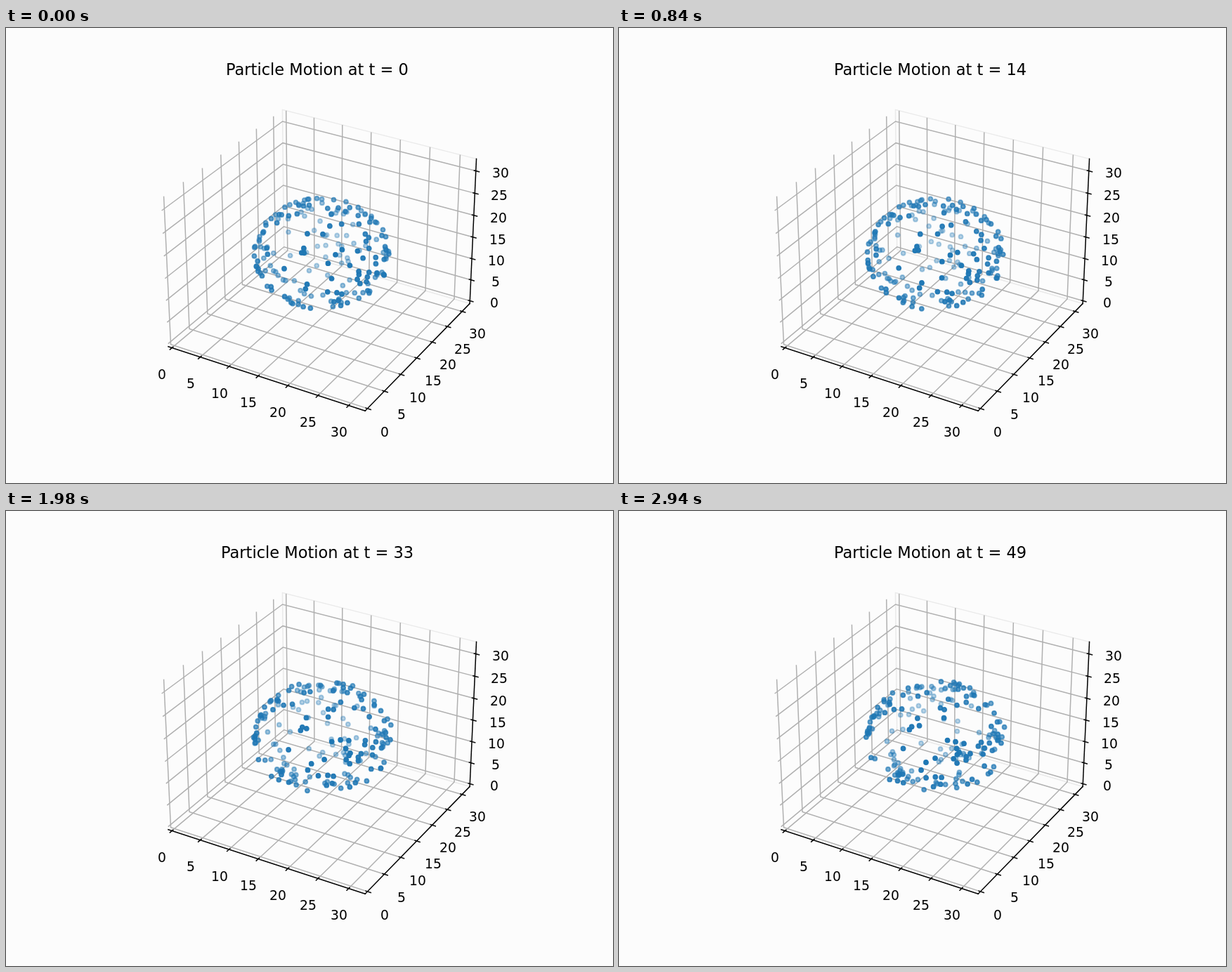
Animation of 864x648 px, one loop 3 s. Source, as an HTML page with a canvas:

```html
<!DOCTYPE html>
<html lang="en">
<head>
<meta charset="utf-8">
<title>Particle Motion</title>
<style>
html, body { margin: 0; width: 100%; height: 100%; overflow: hidden; background: #fcfcfc; }
canvas { display: block; width: 864px; height: 648px; }
</style>
</head>
<body>
<canvas id="stage" width="864" height="648"></canvas>
<script>
const ctx = document.getElementById('stage').getContext('2d');
const FONT = '"DejaVu Sans", Verdana, sans-serif';
const STEPS = 50, STEP_MS = 60;

// Camera: elevation 30, azimuth -60, distance 10
const U = [0.8660254, 0.5, 0];
const V = [-0.25, 0.4330127, 0.8660254];
const W = [0.4330127, -0.75, 0.5];
const DIST = 10, ZOOM = 2697.1, CX = 449.5, CY = 320.5;

// Plot box, in data units
const MID = 16, LO = -2 / 3, HI = 32 + 2 / 3;
const UNIT = [0.0357145, 0.0357145, 0.0267859];

const COUNT = 195, RADIUS = 10;

const dot = (a, b) => a[0] * b[0] + a[1] * b[1] + a[2] * b[2];
const cross = (a, b) => [
  a[1] * b[2] - a[2] * b[1],
  a[2] * b[0] - a[0] * b[2],
  a[0] * b[1] - a[1] * b[0]
];
const add = (a, b, s = 1) => a.map((v, i) => v + b[i] * s);
const scale = (a, s) => a.map(v => v * s);
const unit = a => scale(a, 1 / Math.hypot(...a));

function project(p) {
  const b = p.map((v, i) => (v - MID) * UNIT[i]);
  const depth = DIST - dot(b, W);
  return [CX + dot(b, U) / depth * ZOOM, CY - dot(b, V) / depth * ZOOM, depth];
}

let seed = 20;
function rnd() {
  seed = (seed * 1664525 + 1013904223) >>> 0;
  return seed / 4294967296;
}

// Random direction, even over the sphere
function onSphere(h) {
  const a = rnd() * 2 * Math.PI, r = Math.sqrt(1 - h * h);
  return [r * Math.cos(a), r * Math.sin(a), h];
}

const waves = Array.from({ length: 6 }, () => ({
  k: scale(onSphere(2 * rnd() - 1), 4 + 4 * rnd()),
  phase: 2 * Math.PI * rnd()
}));

// Swirl along the shell, with a weaker pull that gathers particles
function velocity(n) {
  let slope = [0, 0, 0];
  for (const w of waves) {
    slope = add(slope, unit(w.k), Math.cos(dot(w.k, n) + w.phase));
  }
  const pull = add(slope, n, -dot(slope, n));
  return add(cross(n, slope), pull, 0.4);
}

function simulate() {
  const frames = [];
  let pts = Array.from({ length: COUNT }, (_, i) => onSphere(1 - 2 * (i + rnd()) / COUNT));
  for (let t = 0; t < STEPS; t++) {
    const swell = 0.5 * Math.min(1, t / 30);
    const dots = pts.map(n => {
      const r = RADIUS + swell * Math.sin(3 * n[0] - 4 * n[1] + 3 * n[2]);
      return project(n.map(v => MID + v * r));
    });
    frames.push(dots.sort((a, b) => b[2] - a[2]));
    const speed = Math.min(0.005, 0.002 + 0.00015 * t);
    pts = pts.map(n => unit(add(n, velocity(n), speed)));
  }
  return frames;
}

function path(points, color, cap = 'butt') {
  ctx.beginPath();
  for (const p of points) ctx.lineTo(...project(p).slice(0, 2));
  ctx.strokeStyle = color;
  ctx.lineWidth = 1.5;
  ctx.lineCap = cap;
  ctx.stroke();
}
const grid = (...points) => path(points, '#b0b0b0');
const axis = (...points) => path(points, '#000', 'square');

function label(text, x, y, size) {
  ctx.font = size + 'px ' + FONT;
  ctx.fillStyle = '#000';
  const left = x - ctx.measureText(text).width / 2;
  ctx.fillText(text, Math.round(left), Math.round(y));
}

function tickLabel(t, at, dx, dy) {
  const [x, y] = project(at);
  label(t, x + dx, y + dy + 6.8, 18.75);
}

function drawBox() {
  path([[HI, HI, LO], [LO, HI, LO], [LO, HI, HI], [HI, HI, HI]], '#eaeaea');
  for (let t = 0; t <= 30; t += 5) {
    grid([t, LO, LO], [t, HI, LO], [t, HI, HI]);
    grid([HI, t, LO], [LO, t, LO], [LO, t, HI]);
    grid([LO, LO, t], [LO, HI, t], [HI, HI, t]);
  }

  axis([LO, LO, LO], [HI, LO, LO]);
  axis([HI, LO, LO], [HI, HI, LO]);
  axis([HI, HI, LO], [HI, HI, HI]);

  const out = 0.54, inn = 0.27;
  for (let t = 0; t <= 30; t += 5) {
    axis([t, LO - out, LO], [t, LO + inn, LO]);
    axis([HI + out, t, LO], [HI - inn, t, LO]);
    axis([HI + out, HI, t], [HI - inn, HI, t]);
    tickLabel(t, [t, LO, LO], -14, 38);
    tickLabel(t, [HI, t, LO], 24.7 - 0.1 * t, 32.9 - 0.04 * t);
    tickLabel(t, [HI, HI, t], 35, 3);
  }
}

function drawDots(dots) {
  const far = dots[0][2], near = dots[dots.length - 1][2];
  ctx.fillStyle = ctx.strokeStyle = '#1f77b4';
  ctx.lineWidth = 1.9;
  for (const [x, y, depth] of dots) {
    ctx.globalAlpha = 1 - 0.7 * (depth - near) / (far - near);
    ctx.beginPath();
    ctx.arc(x, y, 2.96, 0, 2 * Math.PI);
    ctx.fill();
    ctx.stroke();
  }
  ctx.globalAlpha = 1;
}

const frames = simulate();

function draw() {
  const step = Math.floor(performance.now() / STEP_MS) % STEPS;
  ctx.fillStyle = '#fcfcfc';
  ctx.fillRect(0, 0, 864, 648);
  drawBox();
  drawDots(frames[step]);
  label('Particle Motion at t = ' + step, 442.8, 66.5, 22.5);
  requestAnimationFrame(draw);
}
draw();
</script>
</body>
</html>
```
